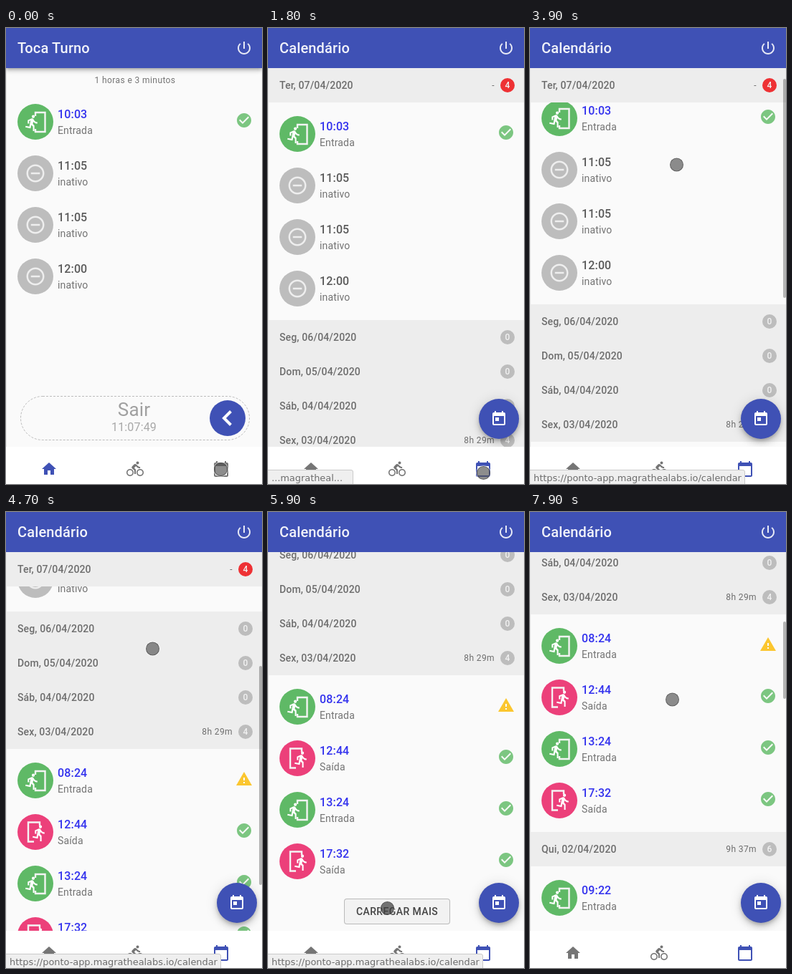
Recreate the animation shown at these times as an HTML page. Size 357x637 px, loop 8 s.

```html
<!DOCTYPE html>
<html lang="pt">
<head>
<meta charset="utf-8">
<style>
html, body { margin: 0; width: 100%; height: 100%; overflow: hidden; background: #fafafa; }
#stage { position: absolute; left: 0; top: 0; width: 357px; height: 637px; overflow: hidden;
  background: #fafafa; font: 400 14px/20px Roboto, sans-serif; letter-spacing: .15px;
  color: rgba(0,0,0,.54); white-space: nowrap; filter: blur(.6px); }
#stage div, #stage span, #stage svg { position: absolute; box-sizing: border-box; }
#stage .flow { position: relative; }
#bar { left: 0; top: 0; width: 357px; height: 56px; background: #3f51b5; }
#bar.raised { box-shadow: 0 2px 4px -1px rgba(0,0,0,.2), 0 4px 5px rgba(0,0,0,.14), 0 1px 10px rgba(0,0,0,.12); }
#title { left: 16px; top: 12px; font: 500 20px/32px Roboto, sans-serif; color: rgba(255,255,255,.93); }
.view { left: 0; top: 56px; width: 357px; height: 529px; overflow: hidden; border-left: 1px solid #ebebeb; }
.view > * { margin-left: -1px; }
.wide { width: 357px; }
.head { height: 48px; background: #ededed; z-index: 1; }
.head .day { left: 16px; top: 0; font-weight: 500; line-height: 48px; }
.head .sum { right: 41px; top: 0; font-size: 12px; line-height: 48px; letter-spacing: .4px; }
.badge { left: 324px; top: 14px; width: 20px; height: 20px; border-radius: 50%; background: #bdbdbd;
  color: #f2f2f2; font: 500 12px/20px Roboto, sans-serif; text-align: center; }
.panel { overflow: hidden; }
.item { height: 72px; }
.time { left: 72px; top: 14px; font: 500 16px/24px Roboto, sans-serif; }
.kind { left: 72px; top: 38px; }
#more { left: 106px; margin: 8px 0; width: 148px; height: 36px; border: 1px solid rgba(0,0,0,.23);
  border-radius: 4px; font-weight: 500; line-height: 34px; letter-spacing: .4px; text-align: center; color: rgba(0,0,0,.72); }
.round { border-radius: 50%; background: #3f51b5; }
#fab { left: 294px; top: 518px; width: 56px; height: 56px;
  box-shadow: 0 3px 5px -1px rgba(0,0,0,.2), 0 6px 10px rgba(0,0,0,.14), 0 1px 18px rgba(0,0,0,.12); }
#load { left: 0; top: 580px; width: 357px; height: 4px; background: #c5cbe9; }
#load div { height: 4px; background: #3f51b5; }
#thumb { left: 353px; width: 4px; border-radius: 2px; background: rgba(0,0,0,.28); }
#nav { left: 0; top: 585px; width: 357px; height: 52px; background: #fff; }
#status { left: -1px; top: 617px; height: 21px; padding-left: 5px; border: 1px solid #cacaca;
  border-radius: 0 3px 0 0; background: #efefef; color: #6c6c6c; overflow: hidden;
  font: 12.9px/21px "DejaVu Sans", sans-serif; letter-spacing: 0; }
#cursor { left: -9.5px; top: -9.5px; width: 19px; height: 19px; border-radius: 50%;
  background: rgba(80,80,80,.65); border: 1px solid rgba(70,70,70,.6); box-shadow: 0 0 0 1px rgba(255,255,255,.55); }
.mid { left: 0; width: 357px; text-align: center; }
</style>
</head>
<body>
<div id="stage"></div>
<script>
const ICONS = {
  power: 'M13 3h-2v10h2V3zm4.83 2.17l-1.42 1.42C17.99 7.86 19 9.81 19 12c0 3.87-3.13 7-7 7s-7-3.13-7-7c0-2.19 1.01-4.14 2.58-5.42L6.17 5.17C4.23 6.82 3 9.26 3 12c0 4.97 4.03 9 9 9s9-4.03 9-9c0-2.74-1.23-5.18-3.17-6.83z',
  check: 'M12 2C6.48 2 2 6.48 2 12s4.48 10 10 10 10-4.48 10-10S17.52 2 12 2zm-2 15l-5-5 1.41-1.41L10 14.17l7.59-7.59L19 8l-9 9z',
  warn: 'M1 21h22L12 2 1 21zm12-3h-2v-2h2v2zm0-4h-2v-4h2v4z',
  minus: 'M7 11v2h10v-2H7zm5-9C6.48 2 2 6.48 2 12s4.48 10 10 10 10-4.48 10-10S17.52 2 12 2zm0 18c-4.41 0-8-3.59-8-8s3.59-8 8-8 8 3.59 8 8-3.59 8-8 8z',
  run: 'M13.49 5.48c1.1 0 2-.9 2-2s-.9-2-2-2-2 .9-2 2 .9 2 2 2zm-3.6 13.9l1-4.4 2.1 2v6h2v-7.5l-2.1-2 .6-3c1.3 1.5 3.3 2.5 5.5 2.5v-2c-1.9 0-3.5-1-4.3-2.4l-1-1.6c-.4-.6-1-1-1.7-1-.3 0-.5.1-.8.1l-5.2 2.2v4.7h2v-3.4l1.8-.7-1.6 8.1-4.9-1-.4 2 7 1.4z',
  home: 'M10 20v-6h4v6h5v-8h3L12 3 2 12h3v8z',
  bike: 'M15.5 5.5c1.1 0 2-.9 2-2s-.9-2-2-2-2 .9-2 2 .9 2 2 2zM5 12c-2.8 0-5 2.2-5 5s2.2 5 5 5 5-2.2 5-5-2.2-5-5-5zm0 8.5c-1.9 0-3.5-1.6-3.5-3.5s1.6-3.5 3.5-3.5 3.5 1.6 3.5 3.5-1.6 3.5-3.5 3.5zm5.8-10l2.4-2.4.8.8c1.3 1.3 3 2.1 5.1 2.1V9c-1.5 0-2.7-.6-3.6-1.5l-1.9-1.9c-.5-.4-1-.6-1.6-.6s-1.1.2-1.4.6L7.8 8.4c-.4.4-.6.9-.6 1.4 0 .6.2 1.1.6 1.4L11 14v5h2v-6.2l-2.2-2.3zM19 12c-2.8 0-5 2.2-5 5s2.2 5 5 5 5-2.2 5-5-2.2-5-5-5zm0 8.5c-1.9 0-3.5-1.6-3.5-3.5s1.6-3.5 3.5-3.5 3.5 1.6 3.5 3.5-1.6 3.5-3.5 3.5z',
  calendar: 'M20 3h-1V1h-2v2H7V1H5v2H4c-1.1 0-2 .9-2 2v16c0 1.1.9 2 2 2h16c1.1 0 2-.9 2-2V5c0-1.1-.9-2-2-2zm0 18H4V8h16v13z',
  today: 'M19 3h-1V1h-2v2H8V1H6v2H5c-1.11 0-1.99.9-1.99 2L3 19c0 1.1.89 2 2 2h14c1.1 0 2-.9 2-2V5c0-1.1-.9-2-2-2zm0 16H5V8h14v11zM7 10h5v5H7z'
};

// Icon centred on (x, y)
const icon = (name, x, y, color, size = 24, id = '') =>
  `<svg ${id && `id="${id}"`} viewBox="0 0 24 24" width="${size}" height="${size}" fill="${color}"
    style="left:${x - size / 2}px;top:${y - size / 2}px"><path d="${ICONS[name]}"/></svg>`;

const KINDS = {
  Entrada: { color: '#5fb966', run: 36, door: 'M25 17V12H38.500V39H25V35' },
  'Saída': { color: '#ec407a', run: 46, door: 'M31 16V11.500H15V38.500H23' },
  inativo: { color: '#bdbdbd' }
};
const MARKS = { check: '#7cc681', warn: '#fbc62f' };

function item(time, kind, mark = 'check') {
  const { color, run, door } = KINDS[kind], off = !door;
  const art = off ? icon('minus', 41, 36, '#eee', 30) :
    `<svg width="50" height="50" style="left:16px;top:11px" fill="none" stroke="#f4f4f4" stroke-width="2.4"><path d="${door}"/></svg>` +
    icon('run', run, 37, '#fff', 25) + icon(mark, 332, 34, MARKS[mark]);
  return `<div class="item wide flow"><div class="round" style="left:16px;top:11px;width:50px;height:50px;background:${color}"></div>${art}
    <span class="time" style="color:${off ? 'rgba(0,0,0,.64)' : '#3433ee'}">${time}</span><span class="kind">${kind}</span></div>`;
}

const head = (id, day) => `<div class="head wide flow" id="${id}"><span class="day">${day}/2020</span>
  <span class="sum"></span><div class="badge">0</div></div>`;
const panel = (id, items) => `<div class="panel wide flow" id="${id}"><div class="flow" style="padding:8px 0">${items}</div></div>`;

const today = item('10:03', 'Entrada') + item('11:05', 'inativo') + item('11:05', 'inativo') + item('12:00', 'inativo');
const friday = item('08:24', 'Entrada', 'warn') + item('12:44', 'Saída') + item('13:24', 'Entrada') + item('17:32', 'Saída');
const thursday = item('09:22', 'Entrada') + item('12:10', 'Saída');

const $ = id => document.getElementById(id);
$('stage').innerHTML = `
  <div class="view" id="home">
    <span class="mid" style="top:7px;font-size:12px;letter-spacing:.4px;padding-left:3px">1 horas e 3 minutos</span>
    <div style="left:0;top:39px">${today}</div>
    <svg width="357" height="80" style="left:0;top:450px" fill="none">
      <rect x="20.5" y="8.5" width="319" height="61" rx="30.5" stroke="#bcbcbc" stroke-dasharray="3 2"/>
      <circle cx="309" cy="39" r="25" fill="#3f51b5"/>
      <path d="M313.500 29.500L304 39L313.500 48.500" stroke="#fff" stroke-width="4"/></svg>
    <span class="mid" style="top:461px;font-size:26px;line-height:32px;color:#a0a0a0">Sair</span>
    <span class="mid" id="clock" style="top:490px;font-size:16px;line-height:24px;color:#a8a8a8"></span>
  </div>
  <div class="view" id="cal"><div class="wide" id="list">
    ${head('ter', 'Ter, 07/04')}${panel('terP', today)}
    ${head('seg', 'Seg, 06/04')}${head('dom', 'Dom, 05/04')}${head('sab', 'Sáb, 04/04')}
    ${head('sex', 'Sex, 03/04')}${panel('sexP', friday)}
    <div class="flow" id="more">CARREGAR MAIS</div>
    ${head('qui', 'Qui, 02/04')}${panel('quiP', thursday)}
  </div></div>
  <div id="load"><div id="fill"></div></div>
  <div id="thumb"></div>
  <div class="round" id="fab">${icon('today', 28, 28, '#fff')}</div>
  <div id="bar"><span id="title"></span>${icon('power', 332, 28, 'rgba(255,255,255,.88)')}</div>
  <div id="nav">${icon('home', 60, 31, '', 24, 'navHome')}${icon('bike', 180, 31, '#757575')}${icon('calendar', 300, 31, '', 24, 'navCal')}</div>
  <div id="status"></div>
  <div id="cursor"></div>`;

const LOOP = 8000;
const SCROLL = [[0, 0], [3800, 8], [3900, 22], [4100, 62], [4300, 125], [4500, 197], [4700, 269],
  [4800, 303], [4900, 334], [5000, 358], [5100, 372], [7600, 390], [7700, 412], [7900, 457]];
const PROGRESS = [[0, 0], [800, 5], [900, 43], [1000, 81], [1100, 112], [1200, 138], [1300, 146], [1400, 150],
  [6400, 0], [6600, 5], [6800, 81], [7000, 138], [7200, 150]];
const OPEN = [[0, 0], [1500, .3], [1600, .75], [1700, .95], [1800, 1]];
const POINTER = [[0, 299, 616], [200, 299, 616], [400, 300, 621], [1900, 300, 621], [2300, 256, 397],
  [2400, 242, 345], [2800, 242, 345], [2900, 199.5, 243.5], [3200, 201, 196], [3300, 201, 196], [3500, 204, 190.5],
  [5500, 204, 190.5], [5900, 166, 553], [6300, 166, 553], [6700, 198, 261.5], [LOOP, 198, 261.5]];

const held = (table, t) => table.filter(k => k[0] <= t).pop()[1];

function glide(table, t) {
  const i = table.findIndex(k => k[0] > t), a = table[i - 1], b = table[i];
  const u = (t - a[0]) / (b[0] - a[0]);
  return [1, 2].map(n => a[n] + (b[n] - a[n]) * u);
}

const within = (t, a, b) => t >= a && t < b;
const show = (id, on) => { $(id).style.display = on ? '' : 'none'; };

function setHead(id, sum, count, color = '#bdbdbd') {
  const [, s, b] = $(id).children;
  s.textContent = sum;
  b.textContent = count;
  b.style.background = color;
}

function draw(t) {
  const home = t < 600, loaded = t >= 1500, extra = t >= 6500, full = t >= 7400;
  const y = held(SCROLL, t), open = held(OPEN, t) * 304;

  show('home', home);
  show('cal', !home);
  show('fab', !home);
  $('bar').className = home ? 'raised' : '';
  $('title').textContent = home ? 'Toca Turno' : 'Calendário';
  $('clock').textContent = t < 100 ? '11:07:49' : '11:07:50';
  $('navHome').style.fill = home ? '#3f51b5' : '#757575';
  $('navCal').style.fill = home ? '#757575' : '#3f51b5';

  $('list').style.transform = `translateY(${-y}px)`;
  $('ter').style.transform = `translateY(${Math.min(y, 304)}px)`;
  $('terP').style.height = $('sexP').style.height = open + 'px';
  $('quiP').style.height = full ? '' : '0';
  for (const id of ['ter', 'seg', 'dom', 'sab', 'sex']) $(id).style.opacity = loaded ? 1 : .82;
  $('qui').style.opacity = full ? 1 : .82;
  if (loaded) setHead('ter', '-', 4, '#ee3134'); else setHead('ter', '', 0);
  setHead('sex', loaded ? '8h 29m' : '', loaded ? 4 : 0);
  setHead('qui', full ? '9h 37m' : '', full ? 6 : 0);
  show('more', !extra);
  show('qui', extra);
  show('quiP', extra);

  const busy = within(t, 700, 1500) || within(t, 6500, 7400);
  show('load', busy);
  $('fill').style.width = held(PROGRESS, t) + 'px';
  $('fab').style.opacity = busy ? .84 : 1;

  const size = full ? 2536 : extra ? 1600 : 901;
  show('thumb', within(t, 3800, 5600) || within(t, 6500, 7000) || full);
  $('thumb').style.top = 58 + y * 525 / size + 'px';
  $('thumb').style.height = 525 * 525 / size + 'px';

  const long = t >= 2900;
  show('status', within(t, 800, 6800));
  $('status').textContent = long ? 'https://ponto-app.magrathealabs.io/calendar' : '...magratheal...';
  $('status').style.width = (long ? 301 : 120) + 'px';
  $('status').style.opacity = t >= 6600 ? .5 : 1;

  const [px, py] = glide(POINTER, t), pressed = within(t, 5900, 6400);
  $('more').style.background = pressed ? 'rgba(0,0,0,.03)' : '';
  $('cursor').style.transform = `translate(${px}px,${py}px)`;
  $('cursor').style.background = pressed || within(t, 300, 600) ? 'rgba(60,60,60,.7)' : '';
}

// The screen refreshes ten times a second
const start = performance.now();
function tick() {
  const t = (performance.now() - start) % LOOP;
  draw(Math.floor(t / 100) * 100);
  requestAnimationFrame(tick);
}
tick();
</script>
</body>
</html>
```
